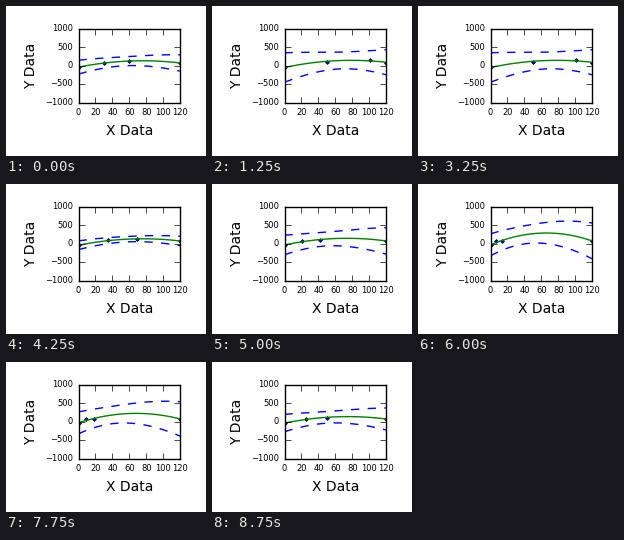
A matplotlib script that plays this animation: 200x150 px, repeating every 9000 ms.

```python
import matplotlib.pyplot as plt
import numpy as np
from matplotlib.animation import FuncAnimation

FRAMES, INTERVAL = 36, 250
X_MAX = 120
T_975 = 12.706  # Student t, 97.5 %, one degree of freedom
ERRORS = np.array([-50, 50, 50, -50])

plt.style.use("classic")
plt.rcParams.update({
    "font.family": "DejaVu Sans",
    "figure.facecolor": "white",
    "savefig.facecolor": "white",
    "savefig.dpi": 100,
})

grid = np.linspace(0, X_MAX, 200)


def sample(frame):
    """Two inner points swing along x; y is x plus a fixed error."""
    step = 30 + 27 * np.sin(2 * np.pi * frame / FRAMES)
    x = np.array([0, step, 2 * step, X_MAX])
    return x, x + ERRORS


def fit(x, y):
    """Quadratic fit on the grid and the half width of its confidence band."""
    coeffs = np.polyfit(x, y, 2)
    residuals = y - np.polyval(coeffs, x)
    s = np.sqrt(np.sum(residuals ** 2) / (len(x) - 3))
    dev = x - x.mean()
    half = T_975 * s * np.sqrt(1 / len(x) + (grid - x.mean()) ** 2 / np.sum(dev ** 2))
    return np.polyval(coeffs, grid), half


fig, ax = plt.subplots(figsize=(2, 1.5), dpi=100)
points, = ax.plot([], [], "bD", markersize=2)
model, = ax.plot([], [], "g-")
upper, = ax.plot([], [], "b--")
lower, = ax.plot([], [], "b--")

ax.set_xlim(0, X_MAX)
ax.set_ylim(-1000, 1000)
ax.set_xticks(range(0, X_MAX + 1, 20))
ax.set_yticks(range(-1000, 1001, 500))
ax.tick_params(labelsize=6)
ax.set_xlabel("X Data", fontsize=10)
ax.set_ylabel("Y Data", fontsize=10)
fig.tight_layout()


def update(frame):
    x, y = sample(frame)
    curve, half = fit(x, y)
    points.set_data(x, y)
    model.set_data(grid, curve)
    upper.set_data(grid, curve + half)
    lower.set_data(grid, curve - half)
    return points, model, upper, lower


anim = FuncAnimation(fig, update, frames=FRAMES, interval=INTERVAL,
                     repeat=True, repeat_delay=0)
plt.show()
```
